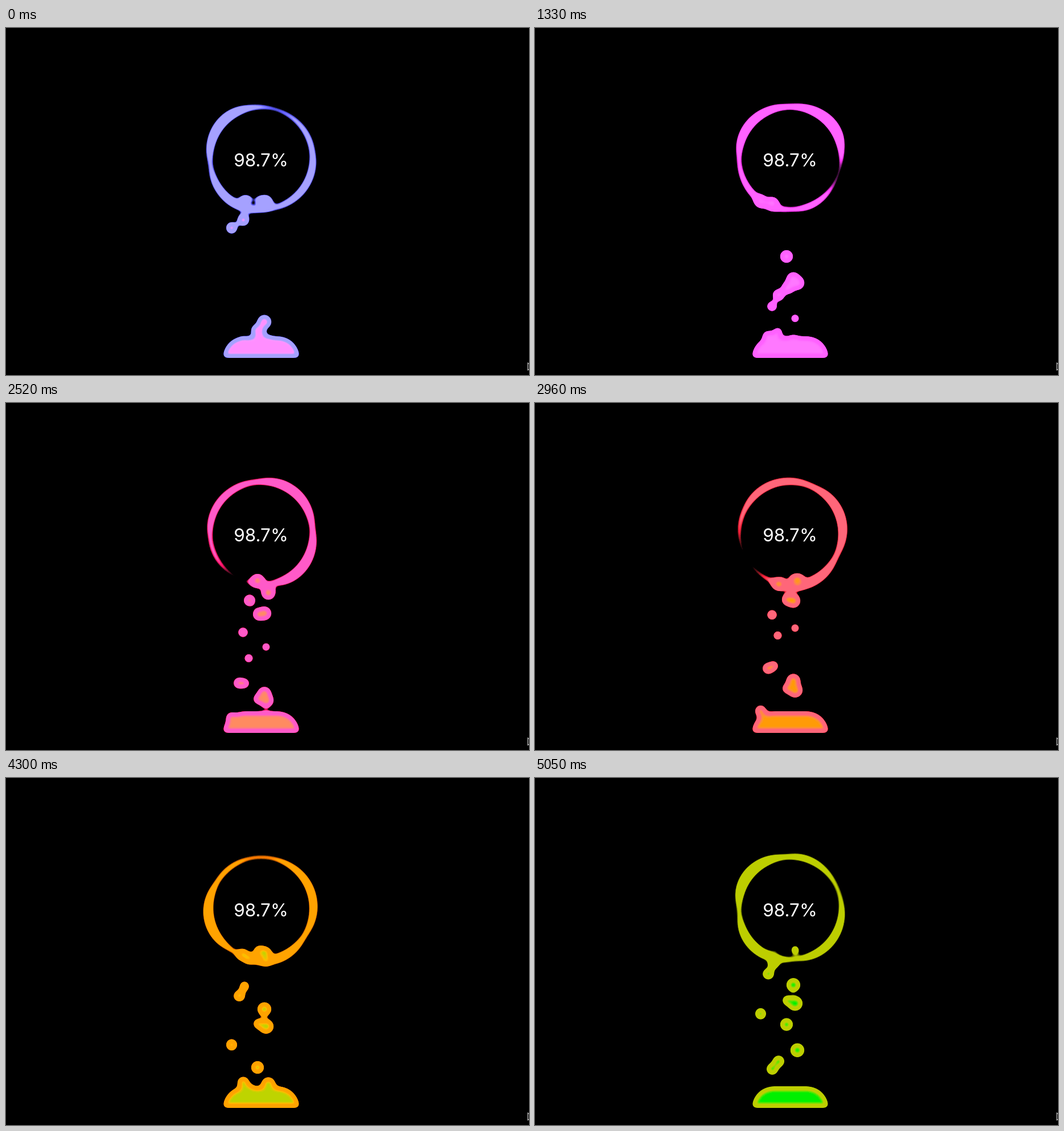
Write an HTML page that moves like this. It is 919 px wide and 609 px high and loops after 5150 ms.

```html
<!DOCTYPE html>
<html lang="en">
<head>
<meta charset="utf-8">
<title>Charging</title>
<style>
  html, body { margin: 0; width: 100%; height: 100%; overflow: hidden; background: #000; }
  #goo, .layer, .layer div { position: absolute; }
  #goo, .layer { left: 0; top: 0; width: 919px; height: 609px; }
  #goo { background: #000; overflow: hidden; }
  .layer div { background: #00ff80; }
  #ring { filter: blur(7.7px); }
  #bubbles { filter: blur(4.8px); }
  #blob { left: 352.5px; top: 132.4px; width: 192px; height: 192px; }
  #ring #hole { left: 364px; top: 143.9px; width: 169px; height: 169px; border-radius: 50%; background: #000; }
  #hill { left: 381.3px; top: 540.6px; width: 134.4px; height: 38.4px; border-radius: 38.4px 38.4px 0 0; }
  .bubble { border-radius: 50%; }
  #label { position: absolute; left: 348px; width: 200px; top: 212px; text-align: center;
    font: 31.5px/40px Inter, "Liberation Sans", sans-serif; color: #fff; }
  svg { position: absolute; left: 0; top: 0; }
</style>
</head>
<body>
<div id="goo">
  <div class="layer" id="ring"><div id="blob"></div><div id="hole"></div></div>
  <div class="layer" id="bubbles"><div id="hill"></div></div>
</div>
<div id="label">98.7%</div>
<svg width="919" height="609">
  <!-- wide-gamut colours shown in sRGB -->
  <filter id="gamut" x="0" y="0" width="1" height="1">
    <feColorMatrix values="1.2249 -.2247 0 0 0  -.042 1.042 0 0 0  -.0196 -.0786 1.0979 0 0  0 0 0 1 0"/>
  </filter>
  <path d="M917 601V587.5L926 597M917 600.5L920 598" fill="none" stroke="#fff"/>
</svg>
<script>
const LOOP = 5150, HOLD = 147.7, STEP = 0.1485;
const START = 3.64, CYCLE = 10;
const FLOOR = 559.8, RISE = 270;

// x, radius, seconds per rise, progress at the start
const bubbles = [
  [396.6, 10.9, 6, .696], [441.7, 11.9, 4, .234], [460.8, 12.8, 4, .130],
  [428.2, 11.2, 4, .079], [454.2, 13.3, 7, .944], [457, 7.9, 6, .081],
  [426.2, 8.5, 5, .952], [416.7, 9.4, 6, .139], [416.7, 11, 9, .741],
  [419, 9.4, 6, .932], [410, 10.7, 7, .994], [457, 13.6, 8, .951],
  [443, 9.4, 8, .957], [453.7, 13, 7, .288], [445, 12, 6, .222]
].map(([x, r, period, offset]) => {
  const el = document.createElement('div');
  el.className = 'bubble';
  el.style.cssText = `left:${x - r}px;top:${FLOOR - r}px;width:${2 * r}px;height:${2 * r}px`;
  document.getElementById('bubbles').append(el);
  return { el, r, period, offset };
});

const goo = document.getElementById('goo');
const blob = document.getElementById('blob');

// cubic-bezier(.42, 0, .58, 1)
function easeInOut(u) {
  let lo = 0, hi = 1;
  for (let i = 0; i < 24; i++) {
    const s = (lo + hi) / 2;
    if (1.26 * s - .78 * s * s + .52 * s ** 3 < u) lo = s; else hi = s;
  }
  return lo * lo * (3 - 2 * lo);
}

const mixRadii = (a, b, k) => a.map((v, i) => v + (b[i] - v) * k + '%').join(' ');

function draw(t) {
  const phase = START + t;
  goo.style.filter =
    `contrast(${10 + 5 * phase / CYCLE}) hue-rotate(${360 * phase / CYCLE}deg) url(#gamut)`;

  const morph = 1 - Math.abs(2 * phase / CYCLE - 1);
  blob.style.borderRadius = mixRadii([42, 38, 62, 49], [45, 45, 45, 45], morph) +
    ' / ' + mixRadii([45, 45, 45, 45], [42, 38, 58, 49], morph);
  blob.style.transform = `rotate(${720 * phase / CYCLE}deg)`;

  for (const { el, r, period, offset } of bubbles) {
    const u = (offset + t / period) % 1;
    el.style.transform = `translateY(${-(RISE - r) * easeInOut(u)}px)`;
    el.style.opacity = u < .9 ? 1 : 1 - .9 * easeInOut((u - .9) * 10);
  }
}

// the motion advances in short holds
function tick() {
  draw(Math.floor(performance.now() % LOOP / HOLD) * STEP);
  requestAnimationFrame(tick);
}
tick();
</script>
</body>
</html>
```
